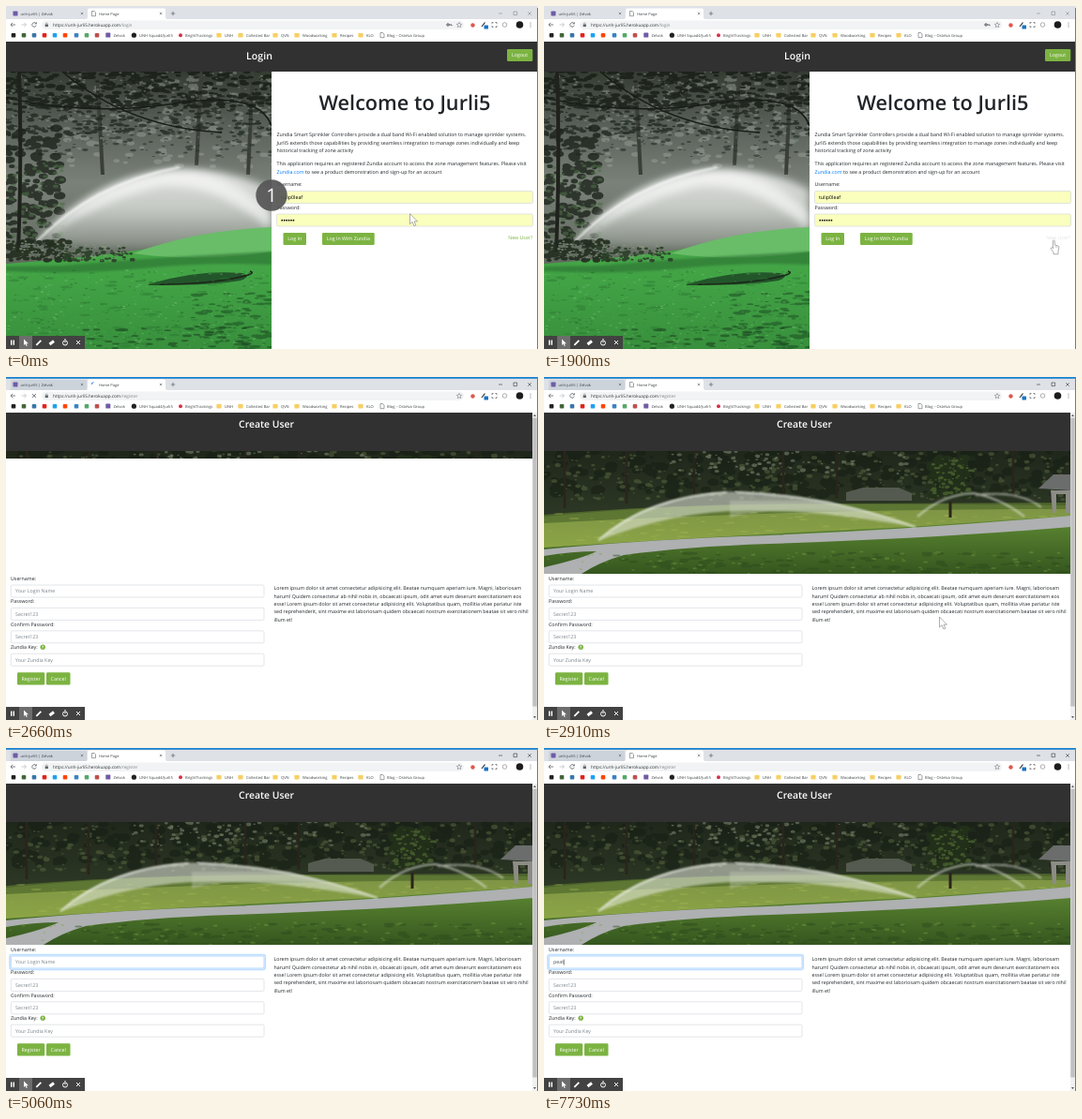
Animation of 567x366 px, one loop 8000 ms. Source, as an HTML page:

```html
<!DOCTYPE html>
<html lang="en">
<head>
<meta charset="utf-8">
<title>Sign-up walkthrough</title>
<style>
html, body { margin: 0; width: 100%; height: 100%; overflow: hidden; background: #fff; }
svg { display: block; }
text { font-family: "Open Sans", "Noto Sans", sans-serif; text-rendering: geometricPrecision; white-space: pre; }
</style>
</head>
<body>
<svg id="stage" width="567" height="366" viewBox="0 0 567 366"></svg>
<script>
const LOOP = 8000, INK = '#212529', GREEN = '#7cb342', DARK = '#313131';
const $ = id => document.getElementById(id);

let seed = 77;
const rnd = () => (seed = seed * 16807 % 2147483647) / 2147483647;

// Drawing helpers, all returning markup
const text = (x, y, s, size = 5.3, fill = INK, more = '') =>
  `<text x="${x}" y="${y}" font-size="${size}" fill="${fill}" ${more}>${s}</text>`;
const box = (x, y, w, h, fill, more = '') =>
  `<rect x="${x}" y="${y}" width="${w}" height="${h}" fill="${fill}" ${more}/>`;
const dot = (x, y, r, fill, more = '') => `<circle cx="${x}" cy="${y}" r="${r}" fill="${fill}" ${more}/>`;
const shape = (d, fill, more = '') => `<path d="${d}" fill="${fill}" ${more}/>`;
const line = (d, stroke = '#5f6368', w = .8, more = '') =>
  `<path d="${d}" fill="none" stroke="${stroke}" stroke-width="${w}" ${more}/>`;
const group = (id, body, more = '') => `<g id="${id}" ${more}>${body}</g>`;
const cross = (x, y, r, c, w) => line(`M${x - r} ${y - r}l${2 * r} ${2 * r}m0 ${-2 * r}l${-2 * r} ${2 * r}`, c, w);
const lines = (x, y, step, rows) => rows.map((s, i) => text(x, y + i * step, s)).join('');
const button = (x, y, w, h, s) => box(x, y, w, h, GREEN, 'rx="1.3"') +
  text(x + w / 2, y + h / 2 + 1.9, s, 5.3, '#fff', 'text-anchor="middle"');
const field = (x, y, w, fill, id = '') =>
  box(x, y, w, 13, fill, `rx="1.4" stroke="#ced4da" stroke-width=".6" id="${id}"`);
const fade = (id, ...stops) => `<linearGradient id="${id}" x2="0" y2="1">` +
  stops.map(([o, c, a = 1]) => `<stop offset="${o}" stop-color="${c}" stop-opacity="${a}"/>`).join('') + '</linearGradient>';

// Scattered dabs for leaves, grass and droplets
function dabs(n, x, y, w, h, r, fill, alpha = 1, flat = .6) {
  let d = '';
  while (n--) {
    const a = r * (.4 + rnd()), b = a * flat;
    d += `M${(x + rnd() * w).toFixed(1)} ${(y + rnd() * h).toFixed(1)}` +
      `a${a.toFixed(1)} ${b.toFixed(1)} 0 1 0 ${(2 * a).toFixed(1)} 0a${a.toFixed(1)} ${b.toFixed(1)} 0 1 0 ${(-2 * a).toFixed(1)} 0`;
  }
  return shape(d, fill, `opacity="${alpha}"`);
}

const defs = '<defs>' +
  fade('woods', [0, '#343c32'], [.2, '#59615a'], [.4, '#798178'], [.62, '#687066'], [1, '#3d473b']) +
  fade('lawn', [0, '#4aa84b'], [.4, '#42a345'], [1, '#388f3c']) +
  fade('mist', [0, '#fff', .75], [.5, '#f2f4f1', .65], [1, '#dfe5df', .2]) +
  fade('grove', [0, '#1f271b'], [.6, '#2f3a26'], [1, '#4a5a33']) +
  fade('meadow', [0, '#7d9345'], [1, '#8fa846']) +
  fade('verge', [0, '#5f8a33'], [1, '#35561f']) +
  '<filter id="soft" x="-20%" y="-20%" width="140%" height="140%"><feGaussianBlur stdDeviation="4"/></filter>' +
  '<filter id="fine"><feGaussianBlur stdDeviation="1"/></filter></defs>';

function gardenPhoto() {
  return `<svg y="70" width="283" height="296" viewBox="0 70 283 296">` +
    box(0, 70, 283, 296, 'url(#woods)') +
    // woods: pale gaps, then needles thinning out downwards
    dabs(160, 60, 76, 225, 95, 4, '#a4aba2', .4, .5) +
    line('M97 70L103 180M208 70L203 170M263 70L258 180', '#3a3f37', 4) +
    dabs(420, -5, 66, 290, 42, 4, '#171d16', .8, .4) +
    dabs(330, -5, 95, 290, 42, 3.2, '#1e261d', .75, .4) +
    dabs(130, -5, 130, 290, 32, 2.6, '#29322a', .65, .4) +
    dabs(200, 0, 70, 283, 75, 1.5, '#8b9487', .5) +
    line('M0 98Q90 118 180 104T283 128M60 70Q130 130 230 135', '#181d17', 1.6) +
    // dark trees on the left
    dabs(170, -6, 130, 58, 125, 4.5, '#1c241b', .8) +
    dabs(90, -4, 165, 62, 88, 2.2, '#4d6d47', .6) +
    line('M14 70Q17 160 13 262', '#20231d', 4) +
    // spray
    shape('M34 251Q88 190 160 178Q225 166 283 196V252Q150 266 34 251z', 'url(#mist)', 'filter="url(#soft)"') +
    shape('M33 251Q90 188 170 175Q235 172 283 222V240Q225 188 165 192Q100 208 33 251z', '#fff', 'opacity=".6" filter="url(#soft)"') +
    line('M33 251Q92 190 185 172', '#fff', 2.5, 'opacity=".7" filter="url(#fine)"') +
    // lawn, bank, bushes and shadows
    shape('M0 275Q70 270 130 262T283 238V366H0z', 'url(#lawn)') +
    shape('M135 264Q200 240 283 236V262Q210 274 135 264z', '#69bd68') +
    shape('M60 277Q160 268 283 262V276Q215 273 145 280T0 283V278z', '#2c6f31', 'opacity=".6" filter="url(#fine)"') +
    dabs(130, -5, 250, 70, 22, 3, '#222d20', .9) +
    dabs(80, 55, 258, 78, 14, 2.2, '#2b4029', .9) +
    dabs(90, 0, 250, 125, 22, 1.2, '#8a967f', .7) +
    shape('M155 296Q205 281 252 285Q262 288 250 293Q205 300 155 296z', '#23552a') +
    line('M152 297Q200 298 235 292T260 283', '#1c2619', 1.6) +
    dabs(70, 195, 305, 90, 60, 5, '#1f5426', .6, .25) +
    dabs(110, 0, 285, 283, 80, 5, '#2a7030', .4, .22) +
    dabs(260, 0, 282, 283, 84, 1.3, '#79c777', .45, .4) +
    dabs(260, 0, 282, 283, 84, 1.3, '#236429', .5, .4) +
    dabs(60, 70, 342, 210, 24, 4, '#173f1d', .55, .25) +
    '</svg>';
}

function streetPhoto() {
  return `<svg id="street" y="79" width="561" height="131"><g transform="translate(0 -79)">` +
    box(0, 79, 561, 131, 'url(#grove)') +
    dabs(300, -8, 76, 570, 50, 6, '#171e14', .6) +
    dabs(260, 0, 79, 561, 52, 2.5, '#56643f', .55) +
    dabs(90, 130, 78, 260, 30, 2.2, '#8b957f', .5) +
    line('M22 79V140M88 79V135M160 79V130M255 79V132M312 79V130M500 79V128', '#2a241c', 2.5) +
    shape('M322 123L340 118H378L392 124V132H322z', '#555a50') +
    shape('M0 149Q120 137 250 136T561 137V190H0z', 'url(#meadow)') +
    shape('M0 147Q150 134 340 135L561 134V141Q300 140 0 156z', '#55702f', 'opacity=".8"') +
    dabs(110, 0, 145, 550, 30, 4, '#a9ba55', .35, .2) +
    shape('M0 182Q180 170 390 160L561 148V210H0z', 'url(#verge)') +
    shape('M0 184Q90 175 210 170Q380 164 561 148V160Q420 172 240 178Q150 181 85 190Q60 197 40 210H0V203Q40 194 56 186Q30 186 0 191z', '#aeb0b1') +
    dabs(120, 70, 188, 490, 24, 5, '#2b481b', .45, .25) +
    dabs(90, 0, 186, 555, 24, 2, '#76a043', .4, .4) +
    shape('M57 175Q110 124 205 122Q305 126 396 160Q300 143 240 143Q150 138 57 175z', '#e6eadf', 'opacity=".55" filter="url(#fine)"') +
    line('M58 174Q112 128 195 123M205 123Q300 126 396 160', '#f4f6ef', 1.6, 'opacity=".8" filter="url(#fine)"') +
    shape('M198 132H302L338 144Q250 136 198 150z', '#c8cfba', 'opacity=".4" filter="url(#fine)"') +
    line('M433 133V150', '#2b2419', 3) +
    dabs(85, 407, 84, 42, 42, 5, '#22301a', .95) +
    dabs(70, 411, 86, 44, 42, 2, '#4c6630', .75) +
    line('M398 149Q425 125 458 124Q488 130 512 149M460 126Q505 120 530 139', '#e9ece2', 1.8, 'opacity=".65" filter="url(#fine)"') +
    shape('M527 119L543 104H561V121z', '#6b6d6c') +
    shape('M540 121H561V145H556V125H546V145H542z', '#8d8c86') +
    '</g></svg>';
}

function browser() {
  const folder = (x, s) => box(x - 2.6, 29, 5.2, 4.4, '#f7cf63', 'rx=".6"') + text(x + 6, 33, s, 4.1, '#3c4043');
  const marks = [[8, '#222'], [19, '#44663a'], [30, '#3976a8'], [41, '#e62117'], [52, '#1da1f2'],
    [63, '#ff4500'], [75, '#3b82c4'], [86, '#55a868'], [97, '#c0504d']];
  return box(0, 0, 567, 14, '#dee1e6') + box(0, 0, 567, 1.8, '#1a82cf', 'id="edge"') +
    shape('M3 14Q5 14 5 12V5Q5 3 7 3H84Q86 3 86 5V14z', '#cdd3db', 'id="backTab"') +
    shape('M85 14Q87 14 87 12V4.5Q87 2.5 89 2.5H168Q170 2.5 170 4.5V12Q170 14 172 14z', '#fff') +
    box(7.5, 5.5, 5, 5, '#6f5ba6', 'rx=".7"') + text(15.5, 9.7, 'unh-jurli5 | Zelvok', 4, '#3c4043') +
    cross(81, 8, 1.2, '#5f6368', .6) + cross(165, 8, 1.2, '#5f6368', .6) +
    group('pageIcon', shape('M91.5 5.5h2.6l1.4 1.4v3.8h-4z', '#fff', 'stroke="#5f6368" stroke-width=".6"')) +
    group('spinner', line('M91.2 8A2.3 2.3 0 0 1 93.5 5.7', '#1a73e8', .9)) +
    text(99, 9.7, '', 4, '#3c4043', 'id="tab"') +
    line('M175.8 8h4.4m-2.2-2.2v4.4', '#5f6368', .7) +
    group('controls', line('M525 8h4M541 6h3.6v3.6h-3.6z', '#333', .6) + cross(558, 8, 1.8, '#333', .6)) +
    box(0, 14, 567, 24, '#fff') + box(38, 15.5, 450, 9.5, '#f1f3f4', 'rx="4.7"') +
    line('M10 20H5m2.2-2.2L5 20l2.2 2.2', '#5f6368') + line('M16.5 20h5m-2.2-2.2L21.5 20l-2.2 2.2', '#bdc1c6') +
    group('reload', line('M32 18.6A2.3 2.3 0 1 0 32.3 20.7M32.4 17.3v1.7h-1.8', '#5f6368')) +
    group('stop', cross(30, 20, 2, '#5f6368', .8)) +
    box(41.7, 19.5, 3.2, 2.6, '#5f6368') + line('M42.4 19.5v-1q.9-1.2 1.8 0v1', '#5f6368', .5) +
    text(50, 21.9, 'https://unh-jurli5.herokuapp.com<tspan id="path" fill="#80868b"></tspan>', 4.65, '#2f3337') +
    group('key', dot(471, 20, 1.2, 'none', 'stroke="#444" stroke-width=".9"') + line('M472 20h3v1.2', '#444', .8)) +
    shape('M483 17.5l.8 1.7 1.9.2-1.4 1.3.4 1.9-1.7-.9-1.7.9.4-1.9-1.4-1.3 1.9-.2z', 'none', 'stroke="#5f6368" stroke-width=".5"') +
    dot(497.5, 20.5, 2.2, '#e0564b') + line('M507 22l3.5-4.5', '#333', 1.2) + box(509.5, 20.5, 4.5, 4, '#1a73c8', 'rx=".6"') +
    line('M518 19v-1.5h1.5m2 0h1.5V19m0 2v1.5h-1.5m-2 0H518V21', '#666', .8) +
    dot(531.5, 20, 2.3, 'none', 'stroke="#999" stroke-width=".8"') + dot(547.5, 20, 3.8, '#1c1c1c') +
    [18, 20, 22].map(y => dot(559, y, .55, '#5f6368')).join('') +
    marks.map(([x, c]) => box(x - 2.3, 28.9, 4.6, 4.6, c, 'rx="1"')).join('') +
    box(106.3, 28.6, 5, 5, '#6f5ba6', 'rx=".7"') + text(114.5, 33, 'Zelvok', 4.1, '#3c4043') +
    dot(136.4, 31.2, 2.6, '#222') + text(142, 33, 'UNH Squad4/Jurli5', 4.1, '#3c4043') +
    dot(186, 31.2, 2, '#d6314a') + text(191, 33, 'BrightTrackings', 4.1, '#3c4043') +
    folder(227, 'UNH') + folder(250, 'Collected Bar') + folder(287, 'QVN') + folder(310, 'Woodworking') +
    folder(350, 'Recipes') + folder(378, 'KLO') +
    shape('M399 28.5h2.6l1.4 1.4v3.8h-4z', '#fff', 'stroke="#5f6368" stroke-width=".6"') +
    text(406, 33, 'Blog – Ostelva Group', 4.1, '#3c4043');
}

function loginPage() {
  return box(0, 38, 567, 328, '#fff') + box(0, 38, 567, 32, DARK) +
    text(270, 57, 'Login', 10.6, '#fff', 'text-anchor="middle" font-weight="600"') +
    button(534, 46, 27.3, 13, 'Logout') + gardenPhoto() +
    text(425, 111, 'Welcome to Jurli5', 21.7, INK, 'text-anchor="middle" font-weight="600"') +
    lines(288.5, 139.3, 8.3, [
      'Zundia Smart Sprinkler Controllers provide a dual band Wi-Fi enabled solution to manage sprinkler systems.',
      'Jurli5 extends those capabilities by providing seamless integration to manage zones individually and keep',
      'historical tracking of zone activity']) +
    lines(288.5, 170.2, 8.3, [
      'This application requires an registered Zundia account to access the zone management features. Please visit',
      '<tspan fill="#007bff">Zundia.com</tspan> to see a product demonstration and sign-up for an account']) +
    text(288.5, 192.4, 'Username:') + field(288.5, 197.5, 273, '#faffbd') + text(293, 206, 'tulip0leaf', 5.3, '#000') +
    text(288.5, 216.9, 'Password:') + field(288.5, 222, 273, '#faffbd') +
    [0, 1, 2, 3, 4, 5].map(i => dot(294.2 + i * 2.45, 228.7, .85, '#000')).join('') +
    button(295.5, 242, 24.5, 13, 'Log In') + button(337, 242, 55.7, 13, 'Log In With Zundia') +
    text(561.3, 248.5, 'New User?', 5.3, GREEN, 'text-anchor="end" id="link"');
}

function registerPage() {
  const row = (i, label, hint, id) => text(5, 217 + i * 24.4, label) +
    field(5.3, 222 + i * 24.4, 269.7, '#fff', id) + text(10, 230.4 + i * 24.4, hint, 5.3, '#7b838a', id && `id="${id}Text"`);
  return box(0, 38, 567, 328, '#fff') + box(0, 38, 561, 41, DARK) +
    text(277.5, 54, 'Create User', 10.4, '#fff', 'text-anchor="middle" font-weight="600"') + streetPhoto() +
    box(3.9, 220.6, 272.5, 15.8, 'none', 'id="ring" rx="2.4" stroke="#bfdeff" stroke-width="1.5"') +
    row(0, 'Username:', 'Your Login Name', 'user') + row(1, 'Password:', 'Secret123') +
    row(2, 'Confirm Password:', 'Secret123') + row(3, 'Zundia Key:', 'Your Zundia Key') +
    line('M0 0v6.2', '#000', .5, 'id="caret"') +
    dot(39.2, 288.3, 2.7, GREEN) + text(39.2, 290, '?', 4.6, '#fff', 'text-anchor="middle" font-weight="700"') +
    button(12, 315.3, 29.2, 13.2, 'Register') + button(43, 315.3, 25.5, 13.2, 'Cancel') +
    lines(285.5, 227.3, 8.35, [
      'Lorem ipsum dolor sit amet consectetur adipisicing elit. Beatae numquam aperiam iure. Magni, laboriosam',
      'harum! Quidem consectetur ab nihil nobis in, obcaecati ipsum, odit amet eum deserunt exercitationem eos',
      'esse! Lorem ipsum dolor sit amet consectetur adipisicing elit. Voluptatibus quam, mollitia vitae pariatur iste',
      'sed reprehenderit, sint maxime est laboriosam quidem obcaecati nostrum exercitationem beatae sit vero nihil',
      'illum et!']) +
    box(561, 38, 5, 328, '#f1f1f1') + box(561.3, 43.5, 4.4, 308, '#c1c1c1') +
    shape('M562 42l1.5-2 1.5 2zM562 362l1.5 2 1.5-2z', '#555');
}

function recorder() {
  return box(0, 352, 84, 14, '#424242') + box(14, 352, 14, 14, '#6d6d6d') +
    line('M5.7 356.5v5.2M8.3 356.5v5.2', '#fff', 1.4) +
    shape('M19 355.5v6.5l1.6-1.4 1.1 2.3 1-.5-1-2.2h2.2z', '#fff') +
    line('M32.3 361.8l5-5', '#fff', 1.8) + line('M46.5 361l4.5-3.5', '#fff', 3) +
    dot(63, 359.5, 2.5, 'none', 'stroke="#fff" stroke-width="1"') + line('M62 355.8h2M63 359.5v-1.5', '#fff', .8) +
    cross(77, 359, 2, '#fff', 1);
}

const pointers =
  group('arrow', shape('M0 0V11L2.6 8.7 4.4 13 6.3 12.2 4.5 8.2H8z', '#fff', 'stroke="#777" stroke-width=".6"')) +
  group('hand', shape('M2.5 1.2Q3.4 0 4.3 1.2V5.5L8 6.7Q9 7.2 8.8 8.5L8 12.5V15.5H3V13.5L.3 9.8Q0 8.3 1.4 8.4L2.5 9.4z', '#fff', 'stroke="#777" stroke-width=".6"') +
    line('M5 8.5V6.2M6.8 9V6.8', '#999', .5)) +
  group('beam', line('M-2-6Q0-6 0-5Q0-6 2-6M0-5V5M-2 6Q0 6 0 5Q0 6 2 6', '#222', .7));

$('stage').innerHTML = defs + group('login', loginPage()) + group('register', registerPage()) +
  browser() + box(566, 2, 1, 364, '#5d7f9c') + recorder() +
  group('count', dot(283, 202, 16.7, '#555', 'opacity=".92"') +
    text(283, 209, '1', 20, '#fff', 'text-anchor="middle"')) + pointers;

// Each row holds until the next one begins
const moves = [
  [0, 'arrow', 430.5, 221.7], [100, 'arrow', 470, 232], [200, 'arrow', 516.7, 244.7],
  [710, 'hand', 540, 250], [1100, 'hand', 540, 249.3], [1750, 'hand', 540, 250], [1900, 'hand', 540, 249.3],
  [2660], [2910, 'arrow', 421.5, 256], [3240, 'arrow', 400.5, 256], [3380, 'arrow', 332.5, 256.5], [3520],
  [3670, 'arrow', 119.5, 244.5], [3790, 'arrow', 67.2, 242], [3930, 'arrow', 66.7, 242.3], [4110],
  [4320, 'beam', 60.5, 235], [4630]];
const typed = [[0, ''], [6610, 'p'], [7150, 'pe'], [7580, 'pea'], [7730, 'peat']];
const at = (rows, t) => rows.findLast(r => r[0] <= t);
const show = (id, on) => $(id).style.display = on ? '' : 'none';
const set = (id, name, value) => $(id).setAttribute(name, value);
const write = (id, s) => { if ($(id).textContent !== s) $(id).textContent = s; };

function draw(t) {
  const within = (a, b) => t >= a && t < b;
  const clicked = t >= 2200, loading = within(2200, 2910), spinning = within(2330, 2910);

  show('login', t < 2660);
  show('register', t >= 2660);
  show('count', t < 100);

  // The browser window gains focus with the click
  show('edge', clicked);
  set('backTab', 'fill', clicked ? '#cdd3db' : '#dee1e6');
  set('controls', 'opacity', clicked ? 1 : .5);
  show('key', !clicked);
  show('stop', loading);
  show('reload', !loading);
  show('spinner', spinning);
  show('pageIcon', !spinning);
  set('spinner', 'transform', `rotate(${t >= 2510 ? 0 : 120} 93.5 8)`);
  write('tab', within(2330, 2510) ? 'unh-jurli5.herokuapp.com/re' : 'Home Page');
  write('path', clicked ? '/register' : '/login');
  set('link', 'fill', t < 710 ? GREEN : '#dfe2e5');
  set('street', 'height', t < 2910 ? 8 : 131);

  const focus = t < 4630 ? 0 : t < 4760 ? .5 : 1;
  set('ring', 'opacity', focus);
  set('user', 'stroke', ['#ced4da', '#a7c9ec', '#80bdff'][focus * 2]);
  const name = at(typed, t)[1];
  write('userText', name || 'Your Login Name');
  set('userText', 'fill', name ? '#495057' : '#7b838a');
  show('caret', within(4760, 5060) || within(6610, 7000) || t >= 7150);
  const end = name ? $('userText').getComputedTextLength() : 0;
  set('caret', 'transform', `translate(${10.2 + end} 225.5)`);

  const [, kind, x, y] = at(moves, t);
  for (const id of ['arrow', 'hand', 'beam']) show(id, id === kind);
  if (kind) set(kind, 'transform', `translate(${x} ${y})`);
}

let start;
function tick(now) {
  start ??= now;
  draw((now - start) % LOOP);
  requestAnimationFrame(tick);
}
draw(0);
requestAnimationFrame(tick);
</script>
</body>
</html>
```
